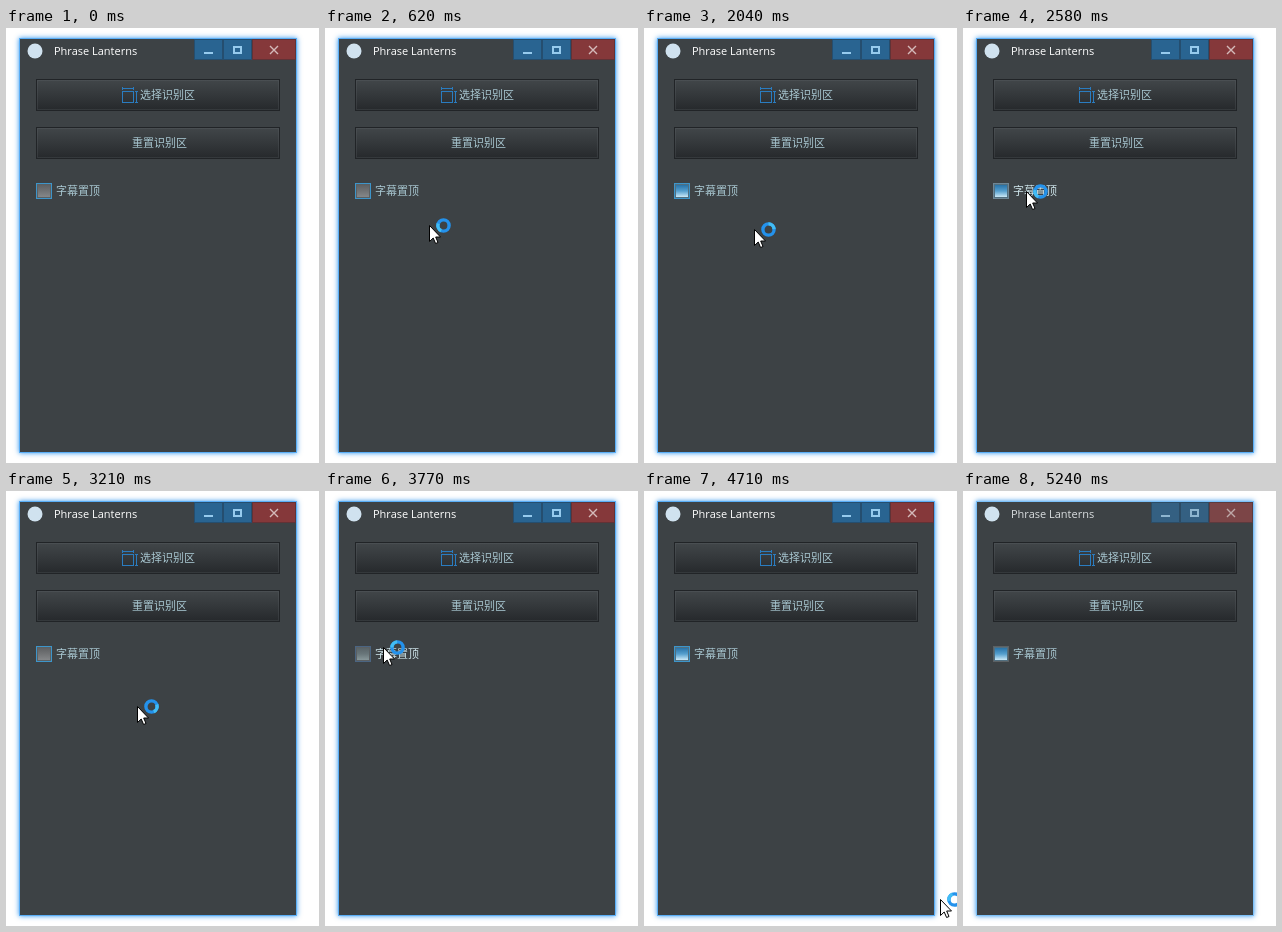
An HTML page with a canvas that plays this animation: 313x435 px, repeating every 5320 ms.

```html
<!DOCTYPE html>
<html lang="zh-CN">
<head>
<meta charset="utf-8">
<title>Phrase Lanterns</title>
<style>
html, body { margin: 0; width: 100%; height: 100%; overflow: hidden; background: #fff; }
canvas { display: block; }
</style>
</head>
<body>
<canvas id="stage" width="313" height="435"></canvas>
<script>
const ctx = document.getElementById('stage').getContext('2d');
const LOOP = 5320, START = 310, STEP = 78.3, LINGER = 4;
const CJK = '11px "Noto Sans CJK SC", "Noto Sans CJK", sans-serif';
const LATIN = '11px "Open Sans", "Noto Sans", sans-serif';

const line = u => u;
const speedUp = u => u * u;
const slowDown = u => 1 - (1 - u) ** 2;
const smooth = u => u * u * (3 - 2 * u);

// pointer stops: step, x, y and the easing of the way there
const stops = [
  [0, 246, 314, line],
  [8, 56, 158, slowDown],
  [13, 59, 163, smooth],
  [20, 141, 226, smooth],
  [29, 63, 163, slowDown],
  [31, 60, 159, smooth],
  [37, 131, 215, smooth],
  [44, 58, 156, slowDown],
  [50, 168, 227, speedUp],
  [55, 286, 392, line],
  [60, 313, 436, slowDown]
];
const clicks = [12, 31, 45];

function pointerAt(k) {
  const i = Math.max(1, stops.findIndex(s => s[0] >= k));
  const [k0, x0, y0] = stops[i - 1], [k1, x1, y1, ease] = stops[i];
  const p = ease((k - k0) / (k1 - k0));
  return [Math.round(x0 + (x1 - x0) * p), Math.round(y0 + (y1 - y0) * p)];
}

const visible = k => k >= 0 && k < 60;

function overCheck(k) {
  if (!visible(k)) return false;
  const [x, y] = pointerAt(k);
  return x >= 30 && x <= 94 && y >= 154 && y <= 172;
}

function mix(a, b, p) {
  return 'rgb(' + a.map((n, i) => Math.round(n + (b[i] - n) * p)) + ')';
}

function rect(x, y, w, h, fill) {
  ctx.fillStyle = fill;
  ctx.fillRect(x, y, w, h);
}

function frame(x, y, w, h, color) {
  ctx.strokeStyle = color;
  ctx.lineWidth = 1;
  ctx.strokeRect(x + 0.5, y + 0.5, w - 1, h - 1);
}

function shade(y, h, ...colors) {
  const g = ctx.createLinearGradient(0, y, 0, y + h);
  colors.forEach((c, i) => g.addColorStop(i / (colors.length - 1), c));
  return g;
}

function text(s, x, y, font, color) {
  ctx.font = font;
  ctx.fillStyle = color;
  ctx.fillText(s, x, y);
}

function drawWindow(dim) {
  rect(0, 0, 313, 435, '#fff');
  ctx.save();
  ctx.shadowColor = '#2f94ee';
  ctx.shadowBlur = 5;
  rect(13, 10, 278, 415, mix([90, 174, 246], [124, 192, 248], dim));
  ctx.restore();
  rect(14, 11, 276, 413, '#3d4245');

  ctx.fillStyle = '#d0e2ef';
  ctx.beginPath();
  ctx.arc(29, 23, 7.5, 0, Math.PI * 2);
  ctx.fill();
  text('Phrase Lanterns', 48, 27, LATIN, mix([255, 255, 255], [218, 222, 224], dim));

  const blue = mix([41, 100, 145], [52, 96, 130], dim);
  const red = mix([133, 56, 58], [124, 69, 71], dim);
  const mark = mix([150, 203, 238], [142, 182, 208], dim);
  [[188, 29, blue], [217, 29, blue], [246, 44, red]].forEach(([x, w, c]) => {
    rect(x, 11, w, 21, c);
    frame(x, 11, w, 21, 'rgba(30,38,46,.35)');
  });
  rect(198, 24, 9, 2, mark);
  ctx.strokeStyle = mark;
  ctx.lineWidth = 2;
  ctx.strokeRect(228, 19, 7, 6);
  ctx.strokeStyle = mix([212, 186, 186], [190, 168, 168], dim);
  ctx.lineWidth = 1.4;
  ctx.beginPath();
  ctx.moveTo(264, 18); ctx.lineTo(272, 26);
  ctx.moveTo(272, 18); ctx.lineTo(264, 26);
  ctx.stroke();
}

function drawButton(y, label, x) {
  rect(30, y, 244, 32, shade(y, 32, '#42474a', '#34383b', '#25282b'));
  frame(30, y, 244, 32, '#212427');
  frame(31, y + 1, 242, 30, 'rgba(110,118,122,.2)');
  text(label, x, y + 20, CJK, '#a9c8d2');
}

function drawAreaIcon() {
  const c = '#2a7cc0';
  frame(116, 63, 12, 12, c);
  rect(117, 60, 10, 1, c);
  rect(116, 59, 1, 3, c);
  rect(127, 59, 1, 3, c);
  rect(130, 64, 1, 10, c);
  rect(129, 63, 3, 1, c);
  rect(129, 74, 3, 1, c);
}

function drawCheck(on, hover, dim) {
  const border = dim === 1 ? '#5c6164' : hover ? (on ? '#6f8796' : '#4b6582') : '#3d95ca';
  rect(30, 155, 16, 16, '#34393c');
  frame(30, 155, 16, 16, border);
  const fill = on ? ['#2873a8', '#559fce', '#cbe8f6']
    : hover ? ['#596468', '#69767a', '#88979a'] : ['#5f6163', '#717375', '#858789'];
  rect(32, 157, 12, 12, shade(157, 12, ...fill));
  frame(31, 156, 14, 14, on ? 'rgba(110,165,195,.5)' : 'rgba(130,135,138,.5)');
  text('字幕置顶', 50, 167, CJK, hover ? '#cfe6ec' : '#a9c8d2');
}

function drawPointer(k) {
  ctx.save();
  ctx.translate(...pointerAt(k));
  ctx.beginPath();
  [[0.5, 0.5], [0.5, 16.5], [4.2, 13], [6.6, 18.5], [9, 17.5], [6.7, 12], [11.5, 12]]
    .forEach(p => ctx.lineTo(...p));
  ctx.closePath();
  ctx.fillStyle = '#fff';
  ctx.fill();
  ctx.strokeStyle = '#000';
  ctx.lineWidth = 1;
  ctx.stroke();

  const ring = (from, sweep, color) => {
    ctx.strokeStyle = color;
    ctx.beginPath();
    ctx.arc(14.5, 0.5, 5.6, from, from + sweep);
    ctx.stroke();
  };
  ctx.lineWidth = 3.4;
  ring(0, Math.PI * 2, '#2492ec');
  ring(k * 0.5, 1.5, '#42bdf5');
  ctx.restore();
}

function draw(t) {
  const k = Math.floor((t - START + 9) / STEP);
  const dim = Math.max(0, Math.min(1, (k - 61) / 2));
  const on = clicks.filter(n => k >= n).length % 2 === 1;
  const hover = overCheck(k) || overCheck(k - LINGER);
  drawWindow(dim);
  drawButton(51, '选择识别区', 134);
  drawAreaIcon();
  drawButton(99, '重置识别区', 126);
  drawCheck(on, hover, dim);
  if (visible(k)) drawPointer(k);
}

const begin = performance.now();
function tick() {
  draw((performance.now() - begin) % LOOP);
  requestAnimationFrame(tick);
}
tick();
</script>
</body>
</html>
```
